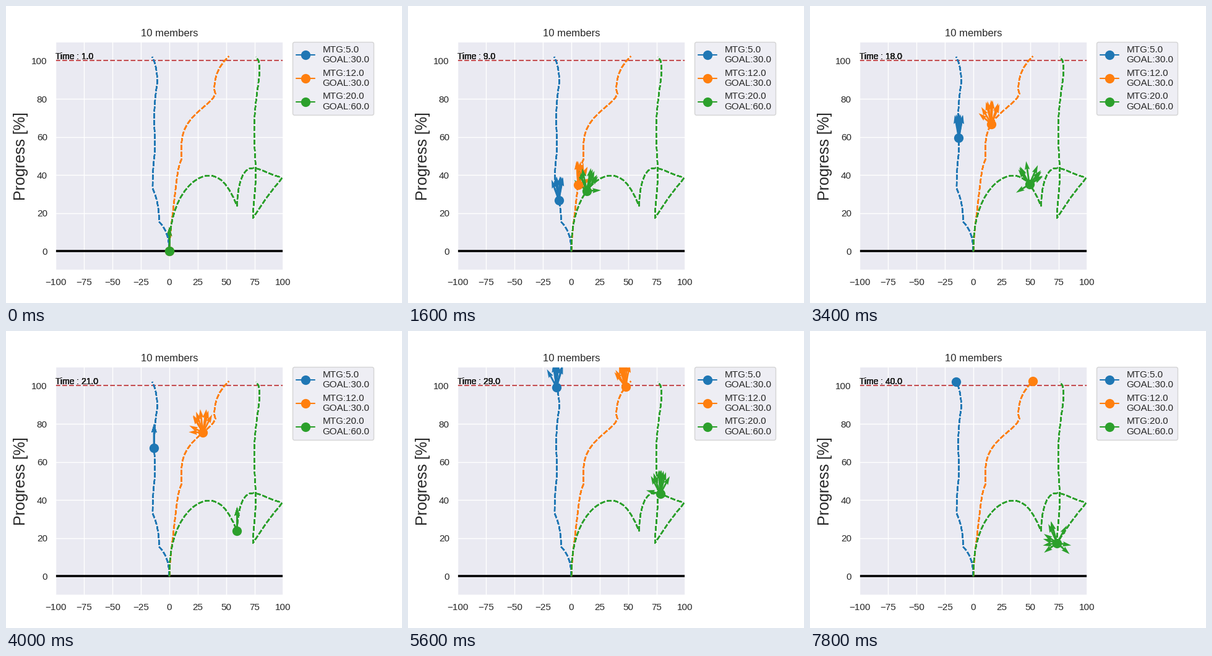
A matplotlib script that plays this animation: 640 by 480 pixels, repeating every 8000 ms.

```python
import numpy as np
import matplotlib.pyplot as plt
from matplotlib.animation import FuncAnimation

STEPS = 40
MEMBERS = 10
SPEED = 100 / 24    # progress per step when everyone pulls straight up
ARROW = 12.5        # arrow length in data units
DRIFT = 14          # degrees each member wanders per step
TALK = 2            # steps for which a meeting keeps everyone aligned

# A path is a chain of legs, one per meeting: (steps, evenly timed points).
BLUE = [
    (5, [(-9, 15.5)]), (5, [(-14.7, 33)]), (5, [(-12.7, 52)]),
    (5, [(-13.4, 67.5)]), (5, [(-10.6, 88.7)]), (4, [(-15, 102)]),
]
ORANGE = [
    (12, [(2.4, 17), (5.9, 34.9), (10.7, 48.3)]),
    (12, [(13, 63.5), (29.5, 75.4), (39.4, 85)]),
    (5, [(52.3, 102.3)]),
]
GREEN = [
    (20, [(4.8, 21.3), (21.2, 36.5), (41.8, 38.8), (59.5, 23.8)]),
    (19, [(66.7, 41.9), (84.2, 41.8), (98.5, 38.6), (73.5, 17.5)]),
    (23, [(75.8, 38.6), (74.6, 59), (77, 83), (76, 102)]),
]

TEAMS = [  # colour, meeting interval, goal, legs
    ("#1f77b4", 5, 30, BLUE),
    ("#ff7f0e", 12, 30, ORANGE),
    ("#2ca02c", 20, 60, GREEN),
]


def trace(legs):
    """Position at each step; every leg sets off straight up at full speed."""
    path = [np.zeros(2)]
    for steps, points in legs:
        start, n = path[-1], len(points)
        rise = np.array([0, SPEED * steps])
        u = np.arange(1, n + 1)[:, None] / n
        bend = np.polyfit(u[:, 0], (points - start - rise * u) / u**2, n - 1)
        for v in np.arange(1, steps + 1) / steps:
            turn = sum(c * v**k for k, c in enumerate(bend[::-1]))
            path.append(start + rise * v + turn * v**2)
    return np.array(path)


def wander(period, rng):
    """Headings that drift apart at random and realign at each meeting."""
    walk = np.zeros((STEPS, MEMBERS))
    for s in range(STEPS):
        if s % period >= TALK:
            walk[s] = walk[s - 1] + rng.normal(0, DRIFT, MEMBERS)
    return np.radians(walk)


plt.rcParams.update({
    "font.family": "Liberation Sans",
    "text.color": ".15",
    "axes.labelcolor": ".15",
    "xtick.color": ".15",
    "ytick.color": ".15",
    "lines.solid_capstyle": "round",
})

fig, ax = plt.subplots(figsize=(6.4, 4.8), dpi=100, facecolor="white")
fig.subplots_adjust(left=.125, right=.7, bottom=.11, top=.88)
ax.set_facecolor("#EAEAF2")
ax.set_axisbelow(True)
ax.grid(color="white", lw=1)
for spine in ax.spines.values():
    spine.set(color="white", linewidth=1.25)
ax.tick_params(length=6, left=False, bottom=False, labelsize=11)
ax.set_title(f"{MEMBERS} members", fontsize=12)
ax.set_ylabel("Progress [%]", fontsize=18)
ax.axhline(100, color="#C44E52", lw=1.5, ls="--")

rng = np.random.default_rng(4)
teams = []
for color, period, goal, legs in TEAMS:
    path = trace(legs)
    # One stroke per member; the stacked edges make the line heavy and crisp.
    for _ in range(MEMBERS):
        ax.axhline(0, color="black", lw=1.5, zorder=1.9)
        ax.plot(*path.T, "--", color=color, lw=1.5)
    dot, = ax.plot([0], [0], "o-", color=color, ms=10, lw=1.5, zorder=2.5,
                   label=f"MTG:{period:.1f}\nGOAL:{goal:.1f}")
    zero = np.zeros(MEMBERS)
    arrows = ax.quiver(zero, zero, zero, zero + ARROW, color=color,
                       angles="xy", scale_units="xy", scale=1, width=.0075)
    teams.append((path, wander(period, rng), dot, arrows))

ax.set(xlim=(-100, 100), ylim=(-10, 110),
       xticks=range(-100, 101, 25), yticks=range(0, 101, 20))
ax.legend(loc="upper left", bbox_to_anchor=(1.04, 1), borderaxespad=0,
          fontsize=11, facecolor="#EAEAF2", edgecolor=".8")
clocks = [ax.text(-100, 100.7, "", fontsize=10) for _ in range(MEMBERS)]


def update(step):
    for path, headings, dot, arrows in teams:
        goal = len(path) - 1
        x, y = path[min(step, goal)]
        dot.set_data([x], [y])
        arrows.set_offsets(np.tile([x, y], (MEMBERS, 1)))
        arrows.set_UVC(ARROW * np.sin(headings[step]),
                       ARROW * np.cos(headings[step]))
        arrows.set_visible(step < goal)
    for clock in clocks:
        clock.set_text(f"Time : {step + 1:.1f}")
    return []


anim = FuncAnimation(fig, update, frames=STEPS, interval=200,
                     repeat=True, repeat_delay=0)
plt.show()
```
